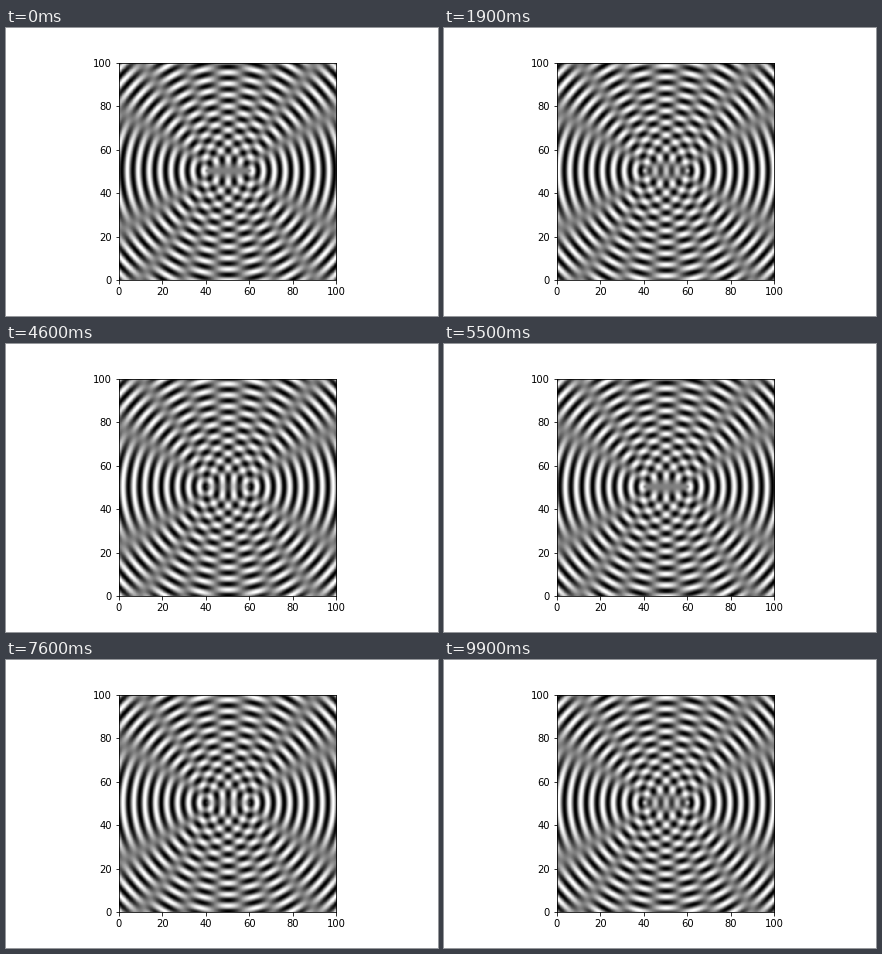
A matplotlib script for the animation above (10000 ms loop, 432 by 288 pixels).

```python
import numpy as np
import matplotlib.pyplot as plt
from matplotlib.animation import FuncAnimation

WAVELENGTH = 5.0
SEPARATION = 20.0
SIDE = 100.0
POINTS = 500
FRAMES = 100
INTERVAL = 100      # ms
STEP = 2.0          # distance the waves travel per frame

plt.rcParams.update({"font.family": "DejaVu Sans", "font.size": 10})

k = 2 * np.pi / WAVELENGTH
axis = np.arange(POINTS) * SIDE / POINTS
x, y = np.meshgrid(axis, axis)


def distance(cx):
    return np.hypot(x - cx, y - SIDE / 2)


r1 = distance((SIDE - SEPARATION) / 2)
r2 = distance((SIDE + SEPARATION) / 2)


def ripples(i):
    """Sum of two circular waves travelling outwards."""
    shift = (i * STEP) % WAVELENGTH
    return np.sin(k * (r1 - shift)) + np.sin(k * (r2 - shift))


fig, ax = plt.subplots(figsize=(6, 4), dpi=72, facecolor="white")
fig.subplots_adjust(left=0.125, right=0.9, bottom=0.125, top=0.88)
image = ax.imshow(ripples(0), origin="lower", extent=[0, SIDE, 0, SIDE],
                  cmap="gray", vmin=-2, vmax=2, interpolation="nearest")


def update(i):
    image.set_data(ripples(i))
    return [image]


anim = FuncAnimation(fig, update, frames=FRAMES, interval=INTERVAL,
                     repeat=True, repeat_delay=0)
plt.show()
```
